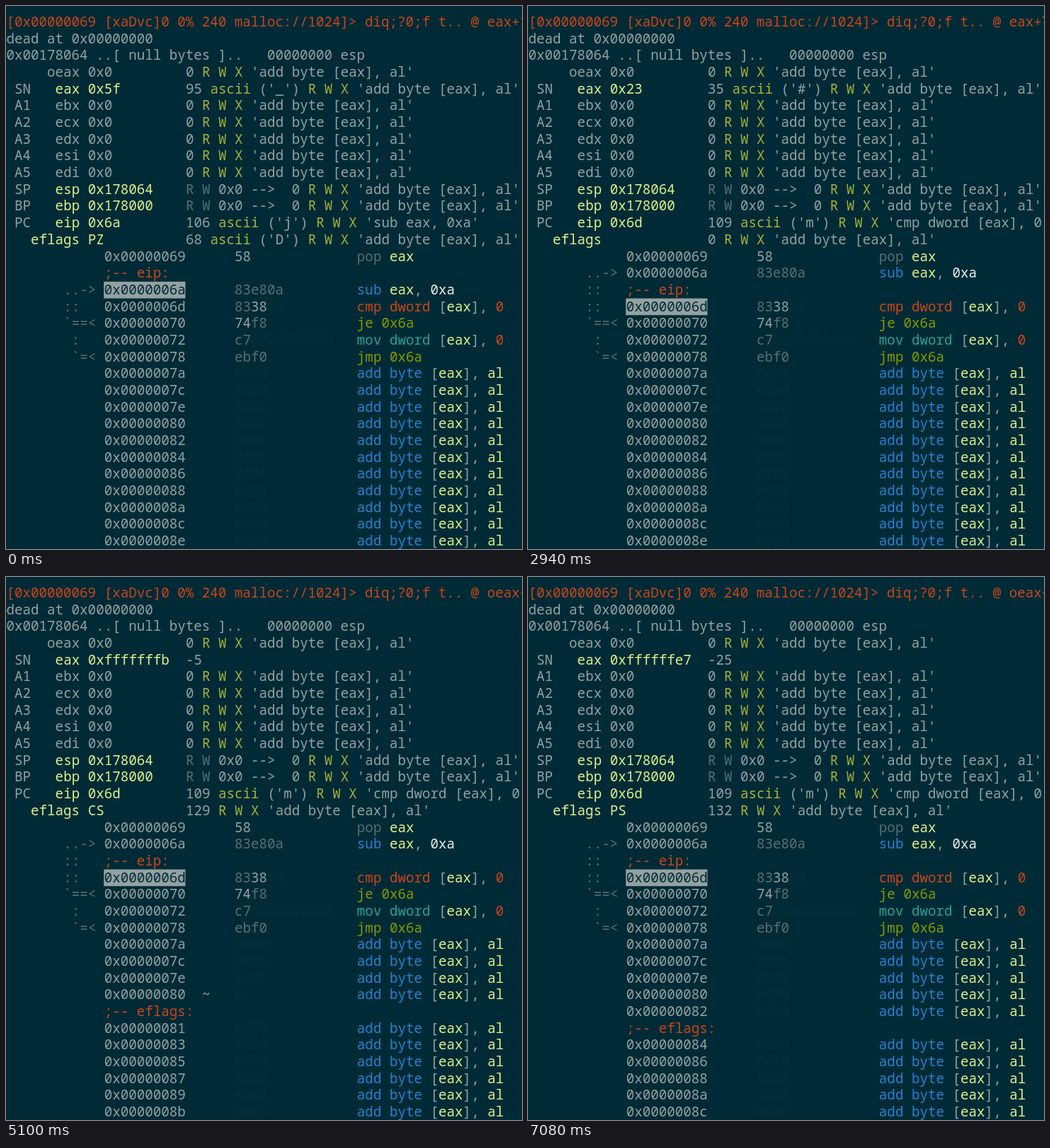
An HTML page with a canvas for the animation above (7.14 s loop, 729x768 px).

```html
<!DOCTYPE html>
<html>
<head>
<meta charset="utf-8">
<style>
  html, body { margin: 0; width: 100%; height: 100%; overflow: hidden; background: #002b36; }
  canvas { display: block; }
</style>
</head>
<body>
<canvas id="screen" width="729" height="768"></canvas>
<script>
const ctx = document.getElementById('screen').getContext('2d');
const LOOP = 7140, CELL = 11.52, LINE = 23.68, BASE = 29, SEEK = 0x69, ROWS = 32;
const BG = '#002b36';
const colors = {
  g: '#93a1a1', d: '#586e75', y: '#dcf08c', o: '#a8b03c', r: '#c8451a',
  b: '#2a80d2', t: '#2aa198', l: '#859900', w: '#e8f0ee', z: '#03313a', i: BG
};

// Markup: ^x switches to colour x.
const ADD = '^badd byte ^g[^yeax^g], ^yal';
const program = [
  // address, arrow, arrow beside a label, bytes, instruction
  [0x69, '', '', '^g58', '^dpop ^yeax'],
  [0x6a, '..->', '', '^d83e80a', '^bsub ^yeax^g, ^w0xa'],
  [0x6d, '::', '::', '^d83^g38^z00', '^rcmp dword ^g[^yeax^g], ^r0'],
  [0x70, '`==<', '|:', '^g74^df8', '^lje 0x6a'],
  [0x72, ' :', ' :', '^dc7^z0000000000', '^tmov dword ^g[^yeax^g], ^r0'],
  [0x78, ' `=<', ' |', '^debf0', '^ljmp 0x6a']
];
const plain = text => text.replace(/\^./g, '');
const hex = (n, width = 0) => '0x' + (n >>> 0).toString(16).padStart(width, '0');

// Run the traced program one instruction per key press.
const pace = { 1: 240, 5: 240, 11: 120, 22: 240, 26: 120, 27: 240, 28: 120, 30: 240, 37: 240 };
const bits = n => (n & 255).toString(2).replace(/0/g, '').length;

function step({ time, eax, eip, flags }) {
  if (eip === 0x6a) {
    const carry = eax >= 0 && eax < 10;
    eax -= 10;
    flags = (carry ? 1 : 0) + (bits(eax) % 2 ? 0 : 4) + (eax < 0 ? 128 : 0);
    eip = 0x6d;
  } else if (eip === 0x6d) {
    flags = eax < 0 ? 4 : 68;
    eip = 0x70;
  } else if (eip === 0x70) {
    eip = flags & 64 ? 0x6a : 0x72;
  } else {
    eip = eip === 0x72 ? 0x78 : 0x6a;
  }
  return { time, eax, eip, flags };
}

const states = [{ time: 0, eax: 0x5f, eip: 0x6a, flags: 68 }];
for (let n = 1; n <= 38; n++) {
  const next = step(states[n - 1]);
  next.time += pace[n] || 180;
  states.push(next);
}

function put(col, row, text, color = 'g') {
  text.split(/\^(.)/).forEach((part, i) => {
    if (i % 2) { color = part; return; }
    ctx.fillStyle = colors[color];
    ctx.fillText(part, col * CELL + 0.5, BASE + row * LINE);
    col += part.length;
  });
}

function describe(value, code = plain(ADD)) {
  if (value < 0) return `${value}`;
  const ascii = value > 32 && value < 127 ? `^oascii ^g('${String.fromCharCode(value)}') ` : '';
  return `${value} ${ascii}^oR W X ^g'${code}'`;
}

function drawRegisters({ eax, eip, flags }) {
  const names = [[1, 'C'], [4, 'P'], [64, 'Z'], [128, 'S']];
  const flagText = names.map(([bit, name]) => flags & bit ? name : '').join('');
  const stack = '^dR W ^g0x0 -->  ' + describe(0);
  const code = plain(program.find(line => line[0] === eip)[4]);
  [
    ['', 'oeax', '0x0', describe(0)],
    ['SN', 'eax', hex(eax), describe(eax), 'y'],
    ...['ebx', 'ecx', 'edx', 'esi', 'edi'].map((name, i) => ['A' + (i + 1), name, '0x0', describe(0)]),
    ['SP', 'esp', '0x178064', stack, 'y'],
    ['BP', 'ebp', '0x178000', stack, 'y'],
    ['PC', 'eip', hex(eip), describe(eip, code), 'y'],
    ['', 'eflags', flagText, describe(flags), 'y']
  ].forEach(([role, name, value, text, color], i) => {
    const row = 3 + i;
    put(1, row, role);
    put(9 - name.length, row, name + ' ' + value, color);
    put(22, row, text);
  });
}

function drawCode({ eip, flags }) {
  let row = 14;
  function line(address, arrow, labelArrow, bytes, code) {
    const label = address === eip ? 'eip' : address === flags ? 'eflags' : '';
    if (label) {
      put(7, row, labelArrow, 'd');
      put(12, row++, `;-- ${label}:`, 'r');
    }
    if (row >= ROWS) return;
    const current = address === eip;
    if (current) {
      ctx.fillStyle = colors.g;
      ctx.fillRect(12 * CELL, BASE + row * LINE - 18, 10 * CELL, LINE);
    }
    put(7, row, arrow, 'd');
    put(12, row, hex(address, 8), current ? 'i' : 'g');
    put(28, row, bytes);
    put(43, row++, code);
  }
  program.forEach(entry => line(...entry));
  for (let address = 0x7a; row < ROWS;) {
    const split = flags === address + 1;
    if (split) put(24, row, '~');
    line(address, '', '', split ? '^z00' : '^z0000', ADD);
    address += split ? 1 : 2;
  }
}

function draw(state) {
  ctx.fillStyle = BG;
  ctx.fillRect(0, 0, 729, 768);
  ctx.font = '19.2px "Noto Sans Mono", "DejaVu Sans Mono", monospace';
  // The prompt names the closest flag at or below the seek address.
  const [name, at] = [['oeax', 0], ['eax', state.eax], ['eflags', state.flags]]
    .filter(flag => flag[1] <= SEEK)
    .reduce((best, flag) => flag[1] > best[1] ? flag : best);
  put(0, 0, `[0x00000069 [xaDvc]0 0% 240 malloc://1024]> diq;?0;f t.. @ ${name}+${SEEK - at}`, 'r');
  put(0, 1, 'dead at 0x00000000');
  put(0, 2, '0x00178064 ..[ null bytes ]..   00000000 esp');
  drawRegisters(state);
  drawCode(state);
}

function frame() {
  const t = performance.now() % LOOP;
  draw(states.filter(state => state.time <= t).pop());
  requestAnimationFrame(frame);
}
frame();
</script>
</body>
</html>
```
